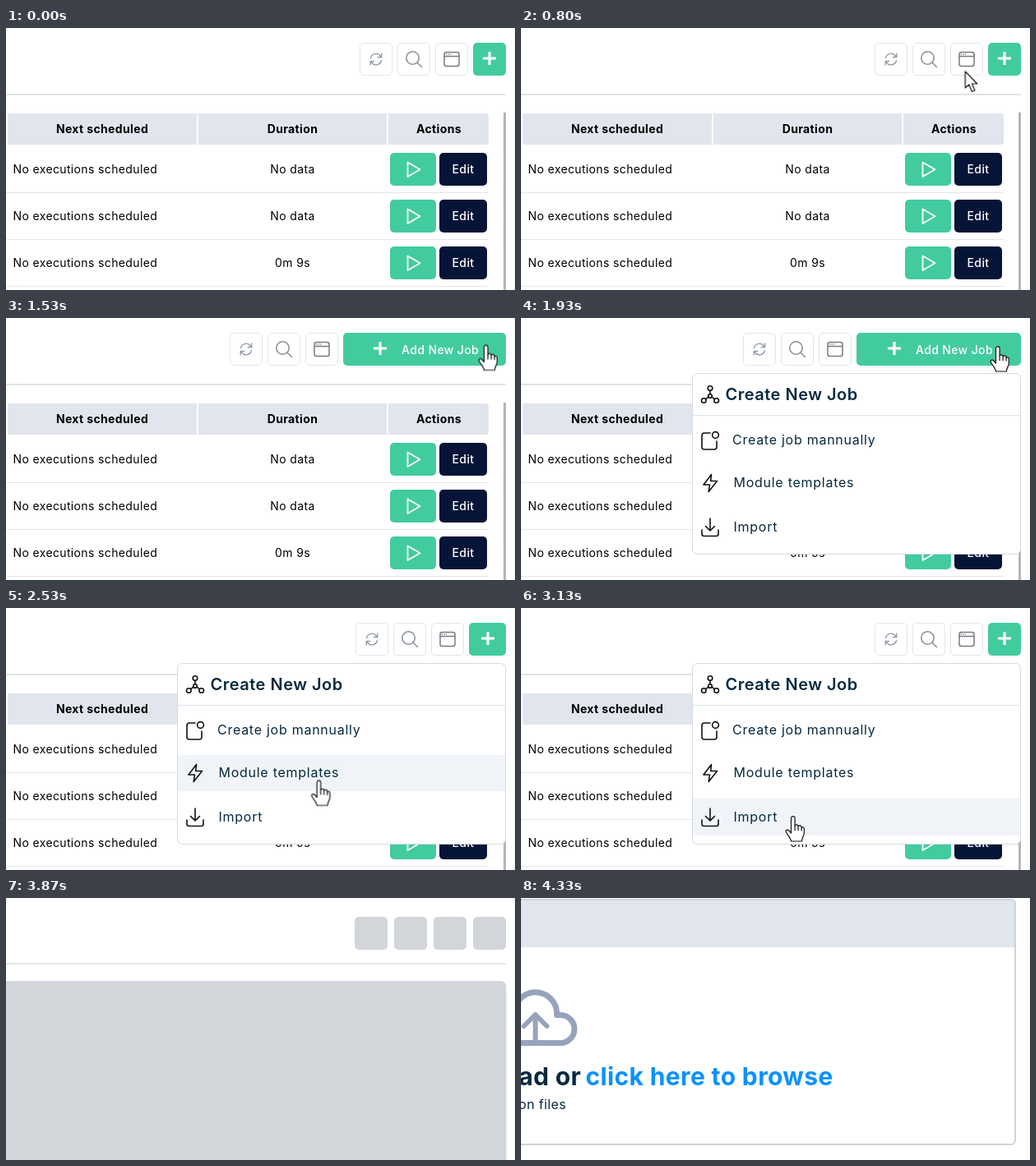
Recreate the animation shown at these times as an HTML page. Size 619x319 px, loop 5.07 s.

```html
<!DOCTYPE html>
<html lang="en">
<head>
<meta charset="utf-8">
<title>Jobs</title>
<style>
  html, body { margin: 0; width: 100%; height: 100%; overflow: hidden; background: #fff; }
  body { position: relative; font: 14px Inter, sans-serif; letter-spacing: .026em; --loop: 5.07s; }
  .layer { position: absolute; left: 0; top: 0; width: 619px; height: 319px; overflow: hidden; }
  svg { display: block; }
  .mid { text-anchor: middle; }
  .line { fill: none; stroke-linecap: round; stroke-linejoin: round; }

  .toolbar { position: absolute; right: calc(100% - 608px); top: 18px; display: flex; gap: 6px; }
  .tool { box-sizing: border-box; width: 40px; height: 40px; border: 1px solid #e2e5e9; border-radius: 5px; background: #fff; }
  .tool svg { margin: -1px; }
  .add { display: flex; align-items: center; justify-content: center; width: 40px; height: 40px;
    border-radius: 5px; background: #43cba0; color: #fff; font-weight: 500; overflow: hidden;
    animation: grow var(--loop) infinite; }
  .add svg { flex: none; position: relative; top: -1px; }
  .label { flex: none; box-sizing: border-box; width: 0; overflow: hidden; white-space: nowrap;
    animation: label var(--loop) infinite; }
  .label span { display: block; padding-left: 18px; }

  .menu, .skeleton, .upload, .hover, .hand { visibility: hidden; }
  .menu, .skeleton, .upload, .hover, .hand, .arrow, .press { animation: var(--loop) step-end infinite; }
  .menu { animation-name: menu; }
  .skeleton { animation-name: skeleton; }
  .upload { animation-name: upload; }
  .hand { animation-name: hand; }
  .arrow { animation-name: arrow; }
  .press { animation-name: press; }
  .hover { fill: #f0f4f8; }
  .first { animation-name: first; }
  .second { animation-name: second; }
  .third { animation-name: third; }
  .menu text { font-size: 16px; letter-spacing: .046em; fill: #06293f; }
  .menu .title { font-size: 20px; font-weight: 600; letter-spacing: .025em; }
  .cursor { animation: travel var(--loop) linear infinite; }

  @keyframes grow {
    0%, 19.72% { width: 40px; animation-timing-function: ease-in-out; }
    31.16%, 42.29% { width: 200px; animation-timing-function: ease; }
    52.1%, 100% { width: 40px; }
  }
  @keyframes label {
    0%, 19.72% { width: 0; margin-right: 0; animation-timing-function: ease-in; }
    26.23%, 42.29% { width: 114px; margin-right: -6px; animation-timing-function: ease; }
    48.92%, 100% { width: 0; margin-right: 0; }
  }
  @keyframes travel {
    0%, 1.7% { transform: translate(-87px, 331px); animation-timing-function: cubic-bezier(.45, 0, .4, 1); }
    20.24%, 26.9% { transform: translate(585px, 33px); animation-timing-function: ease-in-out; }
    36.9%, 38.07% { transform: translate(580px, 35px); animation-timing-function: cubic-bezier(.45, 0, .45, 1); }
    56.61%, 66.47% { transform: translate(331px, 254px); animation-timing-function: cubic-bezier(.45, 0, .4, 1); }
    85.01%, 100% { transform: translate(-43px, 428px); }
  }
  @keyframes menu { 32.94% { visibility: visible; } 69.63% { visibility: hidden; } }
  @keyframes first { 45.36% { visibility: visible; } 47.53% { visibility: hidden; } }
  @keyframes second { 47.53% { visibility: visible; } 50.69% { visibility: hidden; } }
  @keyframes third { 50.69% { visibility: visible; } 69.63% { visibility: hidden; } }
  @keyframes skeleton { 76.33% { visibility: visible; } 85.4% { visibility: hidden; } }
  @keyframes upload { 85.4%, 100% { visibility: visible; } }
  @keyframes hand {
    17.75% { visibility: visible; } 42.29% { visibility: hidden; }
    45.36% { visibility: visible; } 69.63% { visibility: hidden; }
  }
  @keyframes arrow {
    17.75% { visibility: hidden; } 42.29% { visibility: visible; }
    45.36% { visibility: hidden; } 69.63% { visibility: visible; }
  }
  @keyframes press { 60.55% { transform: scale(.9); } 61.74% { transform: none; } }
</style>
</head>
<body>
<div class="layer">
  <!-- Job table -->
  <svg class="layer" viewBox="0 0 619 319">
    <path d="M0 80h608v2H0z" fill="#e2e4e7"/>
    <path d="M618 0h1v319h-1z" fill="#f1f2f4"/>
    <path d="M605 104a1.5 1.5 0 0 1 3 0v215h-3z" fill="#b3b5b9"/>
    <path d="M2 104h230v38H2zM234 104h229v38H234zM465 104h118a4 4 0 0 1 4 4v30a4 4 0 0 1-4 4H465z" fill="#e1e5ee"/>
    <g class="mid" font-weight="700">
      <text x="117" y="128">Next scheduled</text>
      <text x="348.5" y="128">Duration</text>
      <text x="526.5" y="128">Actions</text>
    </g>
    <g id="row">
      <text x="8.5" y="177">No executions scheduled</text>
      <rect x="467" y="152" width="56" height="40" rx="5" fill="#43cba0"/>
      <path class="line" d="M488.5 163.5v17.5l15-8.75z" stroke="#fff" stroke-width="1.8"/>
      <rect x="527" y="152" width="58" height="40" rx="5" fill="#061437"/>
      <text class="mid" x="556" y="177" fill="#fff" font-weight="500">Edit</text>
      <path d="M0 200h587v1H0z" fill="#e4e5e8"/>
    </g>
    <use href="#row" y="57"/>
    <use href="#row" y="114"/>
    <g class="mid">
      <text x="348.5" y="177">No data</text>
      <text x="348.5" y="234">No data</text>
      <text x="348.5" y="291">0m 9s</text>
    </g>
  </svg>

  <div class="toolbar">
    <div class="tool">
      <svg class="line" width="40" height="40" stroke="#8f99a8" stroke-width="1.3">
        <path d="M13.5 18.5a6.7 6.7 0 0 1 12-2.5l1.2 1.5M26.8 13v4.5h-4.5M26.5 21.5a6.7 6.7 0 0 1-12 2.5l-1.2-1.5M13.2 27v-4.5h4.5"/>
      </svg>
    </div>
    <div class="tool">
      <svg class="line" width="40" height="40" stroke="#8b929e" stroke-width="1.6">
        <circle cx="18.5" cy="18.5" r="7.7"/><path d="M24.2 24.2l5.3 5.3"/>
      </svg>
    </div>
    <div class="tool">
      <svg class="line" width="40" height="40" stroke="#777b82" stroke-width="1.5">
        <rect x="11" y="11.5" width="18" height="17" rx="2.5"/>
        <path d="M11 16.5h18M13.5 14h.1M16 14h.1M18.5 14h.1"/>
      </svg>
    </div>
    <div class="add">
      <svg width="16" height="16"><path d="M8 0v16M0 8h16" stroke="#fff" stroke-width="3.2"/></svg>
      <div class="label"><span>Add New Job</span></div>
    </div>
  </div>

  <!-- Create menu -->
  <svg class="layer menu" viewBox="0 0 619 319">
    <rect x="208.5" y="67.5" width="399" height="220" rx="6" fill="#fff" stroke="#d6dae2"/>
    <path d="M209 118h398v1H209z" fill="#dde1eb"/>
    <path class="hover first" d="M209 126h398v45H209z"/>
    <path class="hover second" d="M209 179h398v44H209z"/>
    <path class="hover third" d="M209 232h398v45H209z"/>
    <g class="line" stroke="#111" stroke-width="1.6">
      <circle cx="230" cy="85.5" r="2.8"/><circle cx="222.3" cy="100.5" r="2.8"/>
      <circle cx="237.7" cy="100.5" r="2.8"/><circle cx="230" cy="95" r="2.3"/>
      <path d="M230 88.3v4.4M228 96.2l-3.3 2.5M232 96.2l3.3 2.5"/>
      <path d="M230 140h-7a3 3 0 0 0-3 3v14a3 3 0 0 0 3 3h12a3 3 0 0 0 3-3v-7"/>
      <circle cx="236.5" cy="142.5" r="3.9"/>
      <path d="M231.5 190.5l-9.5 12.5h7.5l-1.3 8.5 10.3-13h-7.8z"/>
      <path d="M230 244v15m-5.5-5.5 5.5 5.5 5.5-5.5M220 258v5a2.5 2.5 0 0 0 2.5 2.5h15a2.5 2.5 0 0 0 2.5-2.5v-5"/>
    </g>
    <text class="title" x="248.5" y="100">Create New Job</text>
    <text x="257" y="154">Create job mannually</text>
    <text x="258.5" y="206">Module templates</text>
    <text x="258.5" y="260">Import</text>
  </svg>

  <!-- Loading placeholders -->
  <svg class="layer skeleton" viewBox="0 0 619 319">
    <path d="M0 0h619v319H0z" fill="#fff"/>
    <path d="M618 0h1v319h-1z" fill="#f1f2f4"/>
    <path d="M0 79h608v2H0z" fill="#e2e4e7"/>
    <path d="M608 106h2v213h-2z" fill="#f5f6f7"/>
    <g fill="#d2d5da">
      <rect id="block" x="424" y="23" width="40" height="40" rx="5"/>
      <use href="#block" x="48"/><use href="#block" x="96"/><use href="#block" x="144"/>
      <rect x="-10" y="101" width="618" height="230" rx="6"/>
    </g>
  </svg>

  <!-- Upload page -->
  <svg class="layer upload" viewBox="0 0 619 319">
    <path d="M0 0h619v319H0z" fill="#fff"/>
    <path d="M618 0h1v319h-1z" fill="#f1f2f4"/>
    <path d="M0 2h601v58H0z" fill="#e0e5ee"/>
    <rect x="-10" y="2" width="611" height="298" rx="5" fill="none" stroke="#cfd2d9" stroke-width="2"/>
    <g class="line" stroke="#97a3ba" stroke-width="7">
      <path d="M-12 176.5H48a16.5 16.5 0 0 0 0-34h-4.5A26 26 0 0 0-8 136"/>
      <path d="M17.5 173v-31M3.5 156l14-14 14 14" stroke-width="6"/>
    </g>
    <g font-size="30" font-weight="700">
      <text x="73" y="228" text-anchor="end" fill="#06293f">upload or</text>
      <text x="78.5" y="228" fill="#0a91ff">click here to browse</text>
    </g>
    <text x="55" y="257" text-anchor="end" font-size="16" fill="#06293f">json files</text>
  </svg>

  <svg class="layer" viewBox="0 0 619 319">
    <g class="cursor" fill="#fff" stroke="#111" stroke-width="1.2" stroke-linejoin="round">
      <path class="arrow" d="M0 0V20L4.6 16 8 24.5 11.6 23 8.2 15H14.5z"/>
      <g class="press"><g class="hand">
        <path d="M-2.5 2a2.3 2.3 0 0 1 4.6 0V11a2.2 2.2 0 0 1 4 .3v.7a2.2 2.2 0 0 1 4 .5v1a1.8 1.8 0 0 1 3.2 1.2V20c0 4-2.8 5-2.8 10H-2.5c0-3-2.5-5-6-11-1.2-2.5 1.5-4 3.3-2l2.7 3z"/>
        <path d="M2.1 11v6M6.1 12v5M10.1 13.5v4" fill="none"/>
      </g></g>
    </g>
  </svg>
</div>
</body>
</html>
```
